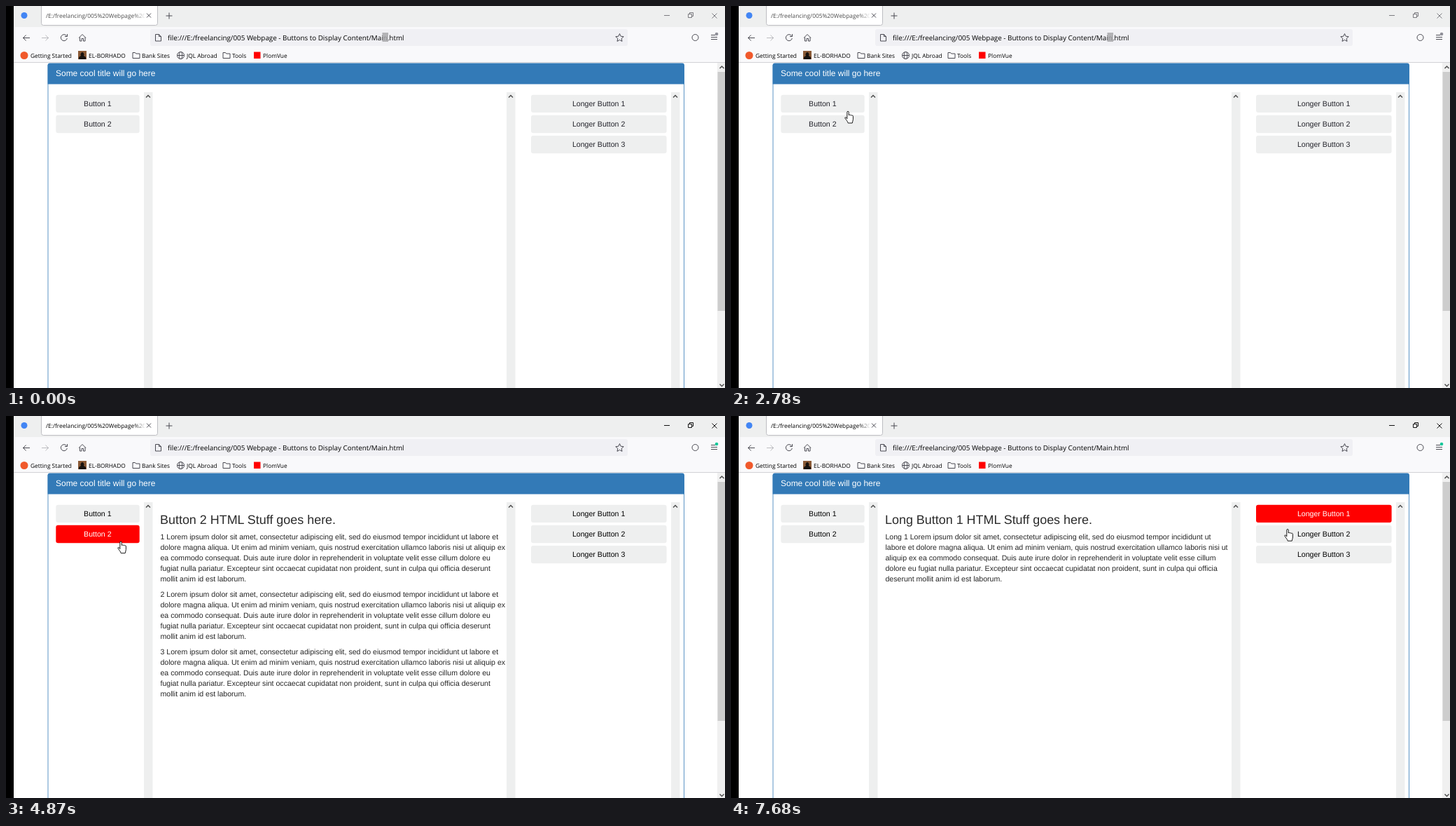
Write an HTML page that moves like this. It is 1027 px wide and 545 px high and loops after 7.99 s.

```html
<!DOCTYPE html>
<html lang="en">
<head>
<meta charset="utf-8">
<title>Buttons to display content</title>
<style>
html, body { margin: 0; width: 100%; height: 100%; overflow: hidden; background: #fff; }
svg { display: block; }
text { text-rendering: geometricPrecision; white-space: pre; }
.page text { font-family: "Liberation Sans", Arial, sans-serif; }
.ui text { font: 8.35px "Open Sans", "Noto Sans", sans-serif; fill: #000; }
.ui .url { font-size: 9.85px; }
.icon, .win { fill: none; stroke: #4a4a52; stroke-width: 1; }
.tab, .win { opacity: .7; }
.active .tab, .active .win { opacity: 1; }
.active .win { stroke: #111; }
.active .mark { display: none; }
.dot { fill: #8f8f98; }
.active .dot { fill: #16c79a; }
.btn rect { fill: #eeefef; }
.btn text { font-size: 10.6px; text-anchor: middle; fill: #24242c; }
.active .btn text { fill: #000; }
.btn.on rect { fill: #f00; }
.active .btn.on text { fill: #fff; }
.btn .press { fill: url(#shade); visibility: hidden; }
.btn.down .press { visibility: visible; }
.head { font-size: 17.93px; fill: #2b2b2b; }
.line { font-size: 10.57px; fill: #262626; }
.cursor path { fill: #fff; stroke: #000; stroke-width: .9; stroke-linejoin: round; }
</style>
</head>
<body>
<svg id="stage" width="1027" height="545" viewBox="0 0 1027 545">
  <defs>
    <linearGradient id="shade" x2="0" y2="1">
      <stop stop-opacity=".12"/><stop offset="1" stop-opacity="0"/>
    </linearGradient>
    <linearGradient id="fade">
      <stop stop-color="#fff" stop-opacity="0"/><stop offset="1" stop-color="#fff"/>
    </linearGradient>
    <clipPath id="tabClip"><rect x="52" width="146" height="27"/></clipPath>
    <path id="folder" class="icon" d="M.5 8.5V.5H4L5.2 2H10.5V8.5Z"/>
  </defs>
  <rect width="1027" height="545" fill="#fff"/>

  <g class="ui">
    <rect width="1027" height="30" fill="#eeefef"/>
    <rect y="30" width="1027" height="51" fill="#f9f9fb"/>
    <rect x="50.5" y="-5" width="166" height="32.5" rx="3" fill="#fff" stroke="#bdbdc2"/>
    <circle cx="26" cy="13.5" r="4.5" fill="#4285f4"/>
    <g class="tab">
      <text x="57" y="17" clip-path="url(#tabClip)">/E:/freelancing/005%20Webpage%20-</text>
      <rect x="182" y="6" width="18" height="16" fill="url(#fade)"/>
    </g>
    <path class="icon" d="M201 10.5l6 6m0-6l-6 6M228.5 14h9M233 9.5v9"/>
    <path class="win" d="M940 13.5h8M974.5 11.5h5v5h-5zM976.5 11.5v-2h5v5h-2M1008.5 10.5l7 7m0-7l-7 7"/>

    <path class="icon" d="M34 45.5H24.5m4-4l-4 4 4 4"/>
    <path class="icon" opacity=".35" d="M51 45.5h9.5m-4-4l4 4-4 4"/>
    <path class="icon" d="M86.5 42.5a4.5 4.5 0 1 0 .8 3.5M87.5 40v3.5H84"/>
    <path class="icon" d="M104 45.5l5-5 5 5M105.5 44.5v5.5h2.5v-3.5h2.5v3.5h2.5v-5.5"/>

    <rect x="206" y="33" width="682" height="24" rx="3" fill="#f0f0f4"/>
    <path class="icon" d="M213.5 40.5h5l3 3v6.5h-8zM218.5 40.5v3h3"/>
    <text class="url" x="231" y="49">file:///E:/freelancing/005 Webpage - Buttons to Display Content/Main.html</text>
    <rect class="mark" x="537.5" y="38" width="8.5" height="13" fill="#a9a9ac" fill-opacity=".85"/>
    <path class="icon" d="M876.5 39.5l1.7 3.7 4 .5-3 2.7.8 4-3.5-2-3.5 2 .8-4-3-2.7 4-.5z"/>
    <circle class="icon" cx="984.5" cy="45" r="4.5"/>
    <path class="icon" d="M1007 41.5h6M1007 44.5h9M1007 47.5h9"/>
    <circle class="dot" cx="1015" cy="40" r="2.3"/>

    <circle cx="26" cy="70.5" r="5.5" fill="#f0592b"/>
    <text x="35" y="74">Getting Started</text>
    <rect x="103" y="64" width="12" height="12" fill="#8a5a36"/>
    <path d="M104 76v-3l3-2a2.5 3 0 1 1 4 0l3 2v3z" fill="#17120f"/>
    <text x="118" y="74">EL-BORHADO</text>
    <use href="#folder" x="180.5" y="66"/>
    <text x="194" y="74">Bank Sites</text>
    <circle class="icon" cx="249.5" cy="70.5" r="5"/>
    <ellipse class="icon" cx="249.5" cy="70.5" rx="2.2" ry="5"/>
    <path class="icon" d="M244.5 70.5h10"/>
    <text x="258" y="74">JQL Abroad</text>
    <use href="#folder" x="309.5" y="66"/>
    <text x="323" y="74">Tools</text>
    <rect x="354" y="65.5" width="9.5" height="9.5" fill="#f00"/>
    <text x="367" y="74">PlomVue</text>
    <path d="M0 80.5H1027" stroke="#d2d2d6"/>
  </g>

  <g class="page">
    <path d="M60 545V84M968.5 545V84" stroke="#337ab7" stroke-width=".8"/>
    <path d="M59.6 111.6V84.5a3 3 0 0 1 3-3H965.9a3 3 0 0 1 3 3V111.6z" fill="#337ab7"/>
    <text x="71" y="100" font-size="11.97" fill="#fff">Some cool title will go here</text>
    <g id="bars"></g>
    <rect x="1016" y="81" width="11" height="464" fill="#f0f0f0"/>
    <rect x="1016.5" y="94" width="10.5" height="341" fill="#cdcdcd"/>
    <path d="M1019.5 89l3-3 3 3M1019.5 539.5l3 3 3-3" fill="none" stroke="#505050" stroke-width="1.5"/>
    <g id="buttons"></g>
    <g id="content"></g>
  </g>
  <g class="cursor"><path id="cursor"/></g>
  <rect width="11" height="545"/>
</svg>
<script>
const LOOP = 7990, ACTIVATE = 2890;
const $ = id => document.getElementById(id);

const lorem = ["Lorem ipsum dolor sit amet, consectetur adipiscing elit, sed do eiusmod tempor incididunt ut labore et",
  "dolore magna aliqua. Ut enim ad minim veniam, quis nostrud exercitation ullamco laboris nisi ut aliquip ex",
  "ea commodo consequat. Duis aute irure dolor in reprehenderit in voluptate velit esse cillum dolore eu",
  "fugiat nulla pariatur. Excepteur sint occaecat cupidatat non proident, sunt in culpa qui officia deserunt",
  "mollit anim id est laborum."];
const longLorem = ["Long 1 Lorem ipsum dolor sit amet, consectetur adipiscing elit, sed do eiusmod tempor incididunt ut",
  "labore et dolore magna aliqua. Ut enim ad minim veniam, quis nostrud exercitation ullamco laboris nisi ut",
  "aliquip ex ea commodo consequat. Duis aute irure dolor in reprehenderit in voluptate velit esse cillum",
  "dolore eu fugiat nulla pariatur. Excepteur sint occaecat cupidatat non proident, sunt in culpa qui officia",
  "deserunt mollit anim id est laborum."];
const numbered = n => [n + " " + lorem[0], ...lorem.slice(1)];

// label, x, y, width
const buttons = [["Button 1", 71.3, 126.7, 119.4], ["Button 2", 71.3, 155.8, 119.4],
  ["Longer Button 1", 750, 126.7, 193.6], ["Longer Button 2", 750, 155.8, 193.6], ["Longer Button 3", 750, 184.9, 193.6]];
const BTN_H = 25.4;

const clicks = [
  { down: ACTIVATE, up: 2960, button: 0, title: "Button 1", paras: [numbered(1)] },
  { down: 4790, up: 4870, button: 1, title: "Button 2", paras: [1, 2, 3].map(numbered) },
  { down: 7140, up: 7290, button: 2, title: "Long Button 1", paras: [longLorem] }
];

// pointer hotspot: time, x, y
const path = [[70, 856, 526], [520, 486, 391], [600, 486, 391], [670, 478, 384], [820, 497, 375], [980, 516, 383],
  [1920, 516, 383], [1990, 504, 376], [2610, 180, 170], [2680, 180, 170], [2820, 162, 142], [3170, 162, 142],
  [3480, 164, 179], [4170, 164, 179], [4240, 164, 178.5], [5180, 164, 178.5], [6020, 788, 156], [6100, 788, 156],
  [6270, 798, 144], [7450, 798, 144], [7680, 795, 161]];

const shapes = {
  arrow: "M.5 0V12L3.2 9.5 5 13.8 6.9 13 5.1 8.8H8.8Z",
  hand: "M-1.2 11V1.7a1.2 1.2 0 0 1 2.4 0V6c.4-.8 2-.8 2.2.2.4-.7 1.9-.6 2.1.3.5-.5 1.9-.3 1.9 1V12c0 2-1 3-1.2 5.2H.2C-.2 15-2.6 12.6-4.1 10.2c-.5-1 .7-1.7 1.5-1z",
  beam: "M-2-6H2M0-6V6M-2 6H2"
};

$("bars").innerHTML = [197, 715, 950].map(x => `<rect x="${x}" y="123" width="12.5" height="422" fill="#eeefef"/>
  <path d="M${x + 3} 130.5l3-3 3 3" fill="none" stroke="#505050" stroke-width="1.5"/>`).join("");

$("buttons").innerHTML = buttons.map(([label, x, y, w]) => `<g class="btn">
  <rect x="${x}" y="${y}" width="${w}" height="${BTN_H}" rx="3"/>
  <rect class="press" x="${x}" y="${y + .7}" width="${w}" height="5" rx="2"/>
  <text x="${x + w / 2 - .2}" y="${Math.round(y) + 16}">${label}</text></g>`).join("");

const pages = clicks.map(({ title, paras }) =>
  `<text class="head" x="220" y="154">${title} HTML Stuff goes here.</text>` +
  paras.map((lines, p) => lines.map((s, i) =>
    `<text class="line" x="220.5" y="${176 + p * 82 + i * 15}">${s}</text>`).join("")).join(""));

function pointerAt(t) {
  const i = path.findIndex(k => k[0] > t);
  if (i < 0) return path[path.length - 1].slice(1);
  const [t0, x0, y0] = path[i - 1], [t1, x1, y1] = path[i], p = (t - t0) / (t1 - t0);
  return [x0 + (x1 - x0) * p, y0 + (y1 - y0) * p];
}

function shapeAt(x, y, page) {
  if (buttons.some(([, bx, by, w]) => x >= bx && x <= bx + w && y >= by && y <= by + BTN_H)) return "hand";
  return page >= 0 && x > 220 && x < 711 && y > 140 && y < 240 ? "beam" : "arrow";
}

let shown = null;
function draw(now) {
  const t = now % LOOP;
  const page = clicks.filter(c => t >= c.up).length - 1;
  $("stage").classList.toggle("active", t >= ACTIVATE);
  if (page !== shown) $("content").innerHTML = pages[page] || "";
  shown = page;
  [...$("buttons").children].forEach((el, i) => {
    el.classList.toggle("on", page >= 0 && clicks[page].button === i);
    el.classList.toggle("down", clicks.some(c => c.button === i && t >= c.down && t < c.up));
  });
  const cursor = $("cursor");
  cursor.style.display = t < path[0][0] ? "none" : "";
  if (t >= path[0][0]) {
    const [x, y] = pointerAt(t);
    cursor.setAttribute("d", shapes[shapeAt(x, y, page)]);
    cursor.setAttribute("transform", `translate(${x} ${y})`);
  }
}

const start = performance.now();
function tick() {
  draw(performance.now() - start);
  requestAnimationFrame(tick);
}
tick();
</script>
</body>
</html>
```
